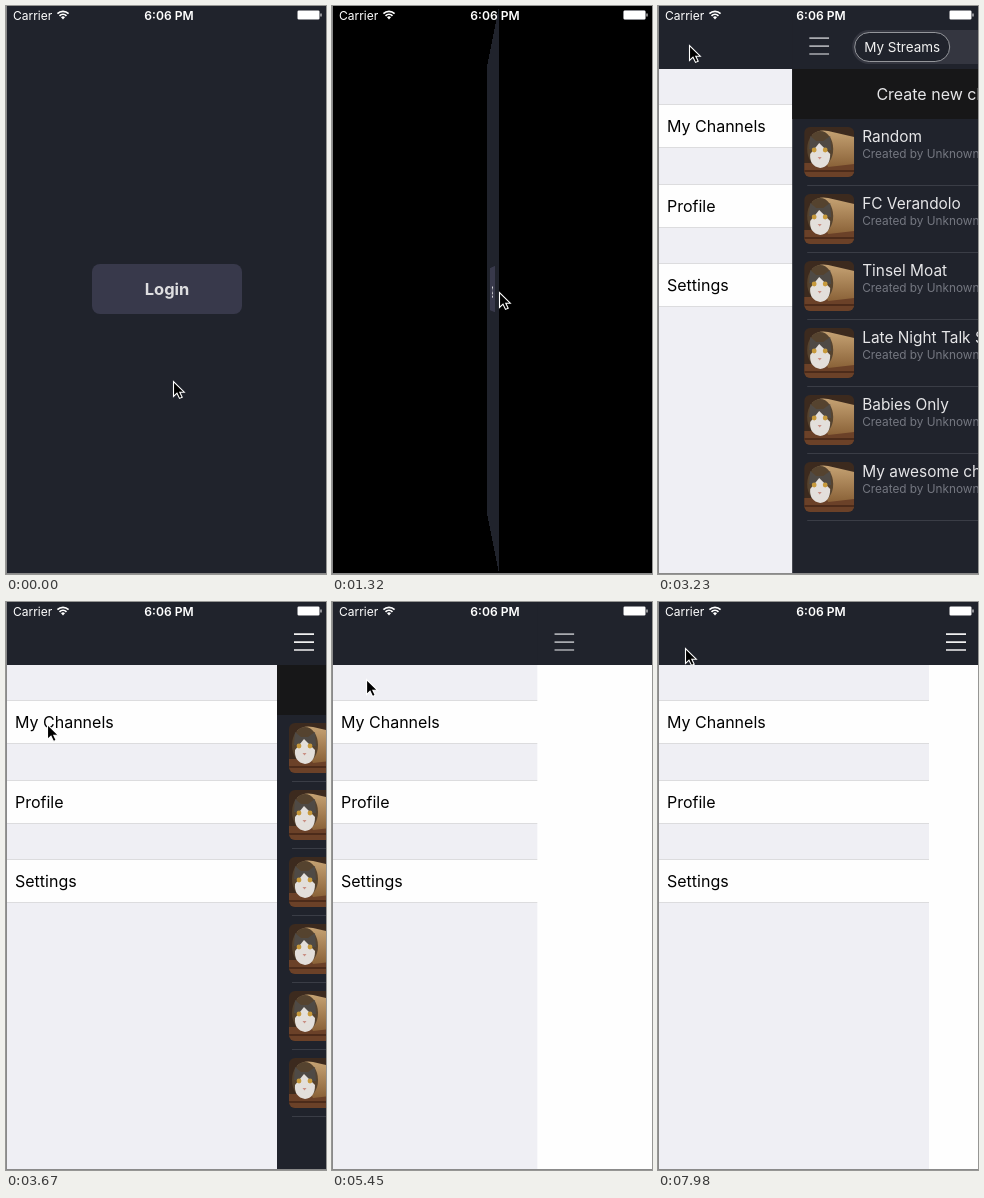
These frames come from a looping animation (320 px wide and 568 px high, 8000 ms). An HTML page:

```html
<!DOCTYPE html>
<html lang="en">
<head>
<meta charset="utf-8">
<title>App walkthrough</title>
<style>
  html, body { margin: 0; height: 100%; overflow: hidden; background: #000; }
  #stage { position: relative; width: 320px; height: 568px; overflow: hidden; background: #000;
    perspective: 1200px; font: 16px/20px Inter, "Open Sans", sans-serif; color: #000; }
  #stage div, #stage svg, #stage span { position: absolute; box-sizing: border-box; }
  span { white-space: pre; }
  .panel { left: 1px; top: 0; width: 319px; height: 568px; overflow: hidden; background: #20232c; }
  .mid { left: 0; width: 100%; text-align: center; }
  #button { left: 85px; top: 258px; width: 150px; height: 50px; border-radius: 8px; background: #38394b;
    color: #dedee0; font-weight: 700; font-size: 16.5px; line-height: 50px; text-align: center; }
  #menu { left: 0; top: 63px; width: 100%; height: 505px; background: #efeff4; }
  .item { left: 0; width: 100%; height: 44px; padding-left: 8px; line-height: 42px; background: #fefefe;
    border: solid #dcdcde; border-width: 1px 0; }
  .item.on { background: #e6e6e6; }
  #center { left: 0; top: 0; width: 319px; height: 568px; }
  #nav { width: 100%; height: 63px; background: #20232c; }
  #burger { left: 17px; top: 31px; width: 20px; height: 18px; }
  #segment { left: 60px; top: 24px; width: 200px; height: 34px; border-radius: 17px; background: #343640;
    font-size: 13.5px; line-height: 34px; text-align: center; color: #888a92; }
  #segment div { left: 2px; top: 2px; width: 96px; height: 30px; border: 1px solid #94969b; border-radius: 15px;
    background: #20232c; color: #f2f2f2; line-height: 28px; }
  #segment span { left: 100px; width: 100px; }
  .page { left: 0; top: 63px; width: 100%; height: 505px; background: #fefefe; }
  #list { background: #20232c; color: #e6e6e8; }
  #create { left: 0; top: 0; width: 100%; height: 50px; line-height: 50px; background: #171718; text-align: center; }
  .row { left: 0; width: 100%; height: 67px; font-size: 15.4px; }
  .row svg { left: 12px; top: 8px; border-radius: 6px; }
  .row span { left: 70px; top: 8px; }
  .row .by { top: 25px; font-size: 11.8px; color: #747780; }
  .row::after { content: ""; position: absolute; left: 15px; right: 0; bottom: 0; height: 1px; background: #3a3d46; }
  #hud { left: 122px; top: 246px; width: 78px; height: 78px; border-radius: 12px; background: #000; }
  #status { left: 0; top: 0; width: 320px; height: 20px; font-size: 12px; line-height: 19px; color: #fff; }
  #edge { inset: 0; border: solid #8a8a8a; border-width: 0 0 1px 1px; }
</style>
</head>
<body>
<div id="stage">
  <div id="login" class="panel"><div id="button">Login</div></div>
  <div id="app" class="panel">
    <div id="menu"></div>
    <div id="center">
      <div id="list" class="page"><div id="create">Create new channel</div></div>
      <div id="profile" class="page"><span style="left:153px;top:240px">Profile</span></div>
      <div id="settings" class="page"><span style="left:161px;top:238px">Settings</span></div>
      <div id="nav">
        <svg id="burger"><path d="M0 1.2h20M0 9.2h20M0 17h20" stroke="currentColor" stroke-width="1.7"/></svg>
        <div id="segment"><div>My Streams</div><span>Explore</span></div>
      </div>
    </div>
  </div>
  <div id="hud"></div>
  <div id="status">
    <span style="left:7px">Carrier</span>
    <span class="mid" style="left:3px;font-weight:600;font-size:12.1px">6:06 PM</span>
    <svg width="320" height="20" fill="none" stroke="#fff" stroke-width="1.7">
      <path d="M51.4 7.7a8 8 0 0 1 11.2 0M53.5 9.9a5 5 0 0 1 7 0"/>
      <path d="M57 13.4l-2-2.1a2.8 2.8 0 0 1 4 0z" fill="#fff" stroke="none"/>
      <rect x="291.5" y="4.5" width="22" height="9" rx="1.5" stroke="#8d8e93" stroke-width="1"/>
      <path d="M292 5h21v8h-21zM314.5 7.5h1v3h-1z" fill="#fff" stroke="none"/>
    </svg>
  </div>
  <div id="edge"></div>
  <svg id="cursor" width="16" height="22" style="left:0;top:0;overflow:visible">
    <path d="M.5.5V15.5L4 12.2 6.5 17.4 9.2 16.2 6.8 11.2H11.3Z" fill="#000" stroke="#fff" stroke-width="1.1"/>
  </svg>
  <svg width="0" height="0">
    <linearGradient id="tube" x2="0" y2="1"><stop stop-color="#c5a273"/><stop offset="1" stop-color="#8a6238"/></linearGradient>
    <symbol id="photo" viewBox="0 0 50 50">
      <path fill="#3c2a1e" d="M0 0h50v50H0z"/>
      <path fill="#6b4128" d="M0 36h50v14H0z"/>
      <path fill="#4c2b1a" d="M0 43h50v2H0z"/>
      <path fill="url(#tube)" d="M8 8Q14 2 24 4L50 10V37L24 40Z"/>
      <ellipse cx="16" cy="22" rx="13" ry="18" fill="#55432f"/>
      <path fill="#4f4a45" d="M5 22L6 9l6 5h7l7-5 1 14z"/>
      <path fill="#e3dfdb" d="M15 16L26 27Q26 40 16 41 5 39 6 27Z"/>
      <circle cx="10" cy="23" r="2.4" fill="#c79a3c"/>
      <circle cx="21" cy="23" r="2.4" fill="#c79a3c"/>
      <path fill="#c98f84" d="M13.500 30h4l-2 2.500z"/>
    </symbol>
  </svg>
</div>
<script>
const $ = id => document.getElementById(id);
const LOOP = 8000, STEP = 147.5, DRAWER = 270;

const channels = ["Random", "FC Verandolo", "Tinsel Moat", "Late Night Talk Show", "Babies Only", "My awesome channel"];
$("list").insertAdjacentHTML("beforeend", channels.map((name, i) =>
  `<div class="row" style="top:${50 + i * 67}px"><svg width="50" height="50"><use href="#photo"/></svg>
   <span>${name}</span><span class="by">Created by Unknown</span></div>`).join(""));
$("menu").innerHTML = ["My Channels", "Profile", "Settings"].map((name, i) =>
  `<div class="item" style="top:${35 + i * 79.5}px">${name}</div>`).join("");
const items = document.querySelectorAll(".item");

const clamp = p => Math.min(1, Math.max(0, p));
const ease = p => (p = clamp(p), p * p * (3 - 2 * p));
// Eased 0..1 change lasting `ms`, halfway done at step `mid`
const swing = (k, mid, ms) => ease((k - mid) * STEP / ms + 0.5);

// Pointer stops: step, x, y
const stops = [[0, 167, 375], [6, 167, 286], [14, 167, 286], [20, 31, 39], [22, 31, 39], [26, 51, 205],
  [30, 51, 205], [35, 30, 40], [36, 30, 40], [40, 56, 277], [44, 56, 277], [49, 27, 46], [55, 27, 46]];
function pointer(k) {
  const i = stops.findIndex(s => s[0] > k);
  const [k0, x0, y0] = stops[i - 1], [k1, x1, y1] = stops[i];
  const p = ease((k - k0) / (k1 - k0));
  return [x0 + (x1 - x0) * p, y0 + (y1 - y0) * p];
}

const opens = [22.01, 36.6, 51], closes = [28.37, 42.58];
const show = (id, on) => $(id).style.visibility = on ? "inherit" : "hidden";

function draw(t) {
  const k = Math.floor((t + 15) / STEP); // the screen refreshes in steps

  const turn = 180 * swing(k, 9.03, 500);
  const back = -160 * Math.sin(turn * Math.PI / 180);
  const flip = a => a ? `translateZ(${back}px) rotateY(${a}deg)` : "none";
  $("login").style.transform = flip(-turn);
  $("app").style.transform = flip(180 - turn);
  $("login").style.visibility = turn < 90 ? "visible" : "hidden";
  $("app").style.visibility = turn < 90 ? "hidden" : "visible";
  $("hud").style.opacity = k > 10 ? 0.2 * clamp((12.4 - k) / 1.4) : 0;

  const sum = mids => mids.reduce((s, mid) => s + swing(k, mid, 330), 0);
  $("center").style.transform = `translateX(${DRAWER * (sum(opens) - sum(closes))}px)`;
  $("burger").style.color = opens.some(mid => Math.abs(k - mid) < 1) ? "#a9abb0" : "#f0f0f0";
  items[1].classList.toggle("on", k >= 28 && k < 32);
  items[2].classList.toggle("on", k >= 42 && k < 46);
  show("list", k < 28);
  show("segment", k < 28);
  show("profile", k >= 28 && k < 42);
  show("settings", k >= 42);

  const [x, y] = pointer(k);
  $("cursor").style.transform = `translate(${x}px, ${y}px)`;
}

function tick() {
  draw(performance.now() % LOOP);
  requestAnimationFrame(tick);
}
tick();
</script>
</body>
</html>
```
